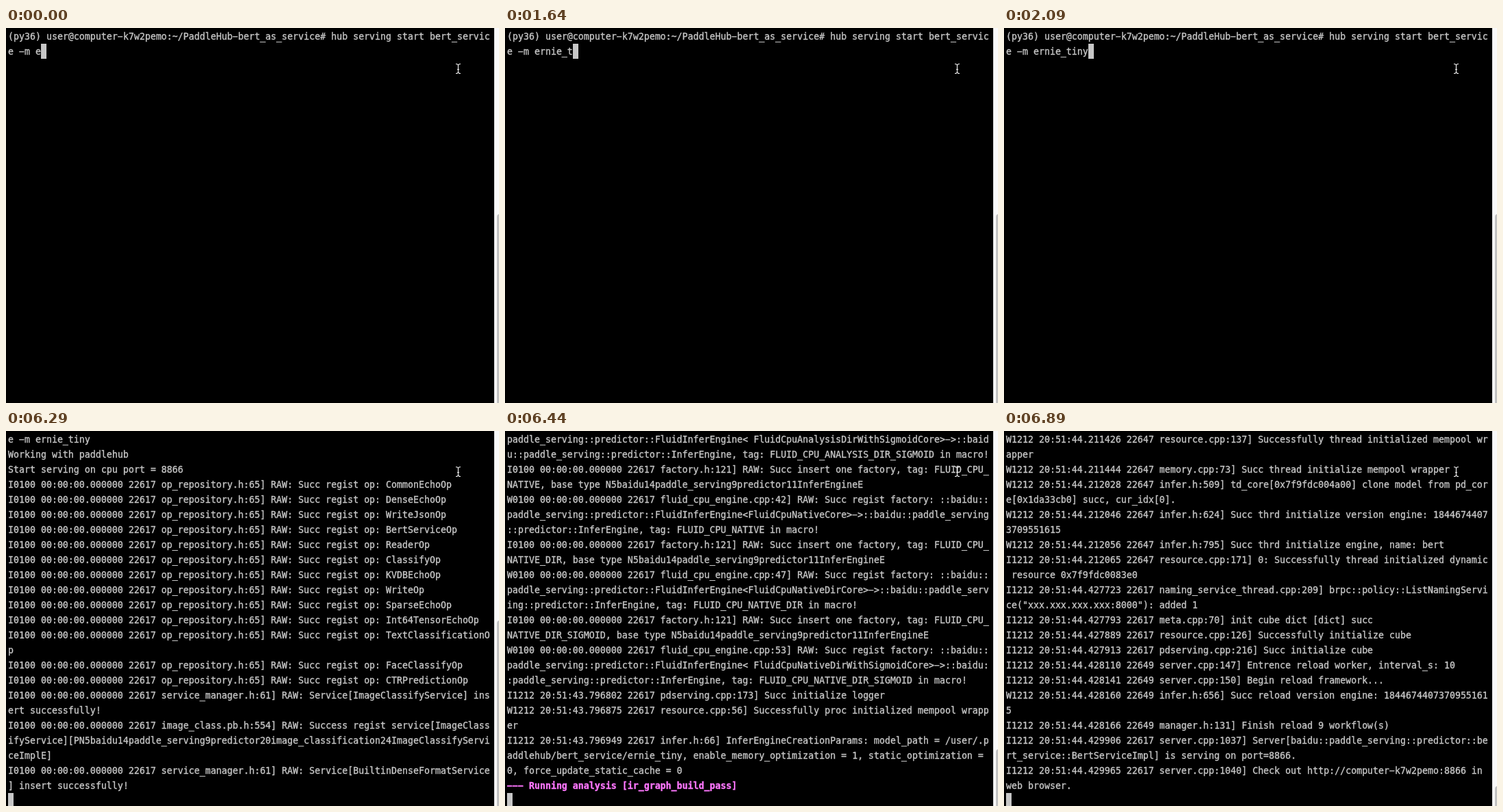
Animation of 719 by 548 pixels, one loop 8000 ms. Source, as an HTML page:

```html
<!DOCTYPE html>
<html lang="en">
<head>
<meta charset="utf-8">
<title>Terminal session</title>
<style>
html, body { margin: 0; width: 100%; height: 100%; overflow: hidden; background: #000; }
#stage { position: relative; width: 719px; height: 548px; overflow: hidden; }
#stage > * { position: absolute; }
#screen {
  left: 3px; top: 2px; color: #c7c7c7; white-space: pre;
  font: 13.289px/22px "DejaVu Sans Mono", monospace;
  -webkit-text-stroke: 0.35px;
}
#screen div { height: 22px; }
#screen .pass { color: #ff77ff; font-weight: bold; }
#cursor { width: 8px; height: 22px; background: #c7c7c7; }
#track { left: 712px; top: 0; width: 7px; height: 548px; background: #fafafa; }
#thumb { left: 716px; width: 8px; height: 600px; border-radius: 4px; background: #c1c1c1; }
#pointer { left: 655px; top: 51px; }
</style>
</head>
<body>
<div id="stage">
  <div id="screen"></div>
  <div id="cursor"></div>
  <div id="track"></div>
  <div id="thumb"></div>
  <svg id="pointer" width="9" height="17" fill="none" stroke="#eee" stroke-width="1.2">
    <path d="M1 1.5Q4.5 1.5 4.5 4V13Q4.5 15.5 1 15.5M8 1.5Q4.5 1.5 4.5 4M4.5 13Q4.5 15.5 8 15.5M3 9.5H6"/>
  </svg>
</div>
<script>
const LOOP = 8000, COLS = 88, ROWS = 24;
const $ = id => document.getElementById(id);
const host = 'computer-k7w2pemo';
const command = `(py36) user@${host}:~/PaddleHub-bert_as_service# hub serving start bert_service -m `;
const model = 'ernie_tiny';
const keyTimes = [0, 150, 290, 440, 590, 1040, 1640, 1790, 1940, 2090];

const boot = (level, msg) => `${level}0100 00:00:00.000000 22617 ${msg}`;
const run = (level, time, thread, msg) => `${level}1212 20:51:${time} ${thread} ${msg}`;
const wrap = lines => lines.flatMap(line => line.match(new RegExp(`.{1,${COLS}}`, 'g')));

// Operator registration
const op = name => boot('I', `op_repository.h:65] RAW: Succ regist op: ${name}Op`);
const inserted = name => boot('I', `service_manager.h:61] RAW: Service[${name}] insert successfully!`);
const registered = wrap([
  command + model,
  'Working with paddlehub',
  'Start serving on cpu port = 8866',
  ...['CommonEcho', 'DenseEcho', 'WriteJson', 'BertService', 'Reader', 'Classify', 'KVDBEcho', 'Write',
    'SparseEcho', 'Int64TensorEcho', 'TextClassification', 'FaceClassify', 'CTRPrediction'].map(op),
  inserted('ImageClassifyService'),
  boot('I', 'image_class.pb.h:554] RAW: Success regist service[ImageClassifyService]' +
    '[PN5baidu14paddle_serving9predictor20image_classification24ImageClassifyServiceImplE]'),
  inserted('BuiltinDenseFormatService')
]);

// Engine factories
const engine = (core, tag) => `paddle_serving::predictor::FluidInferEngine<${core}Core>->` +
  `::baidu::paddle_serving::predictor::InferEngine, tag: FLUID_CPU_${tag} in macro!`;
const factory = (line, core, tag) =>
  boot('W', `fluid_cpu_engine.cpp:${line}] RAW: Succ regist factory: ::baidu::${engine(core, tag)}`);
const made = tag => boot('I', `factory.h:121] RAW: Succ insert one factory, tag: FLUID_CPU_${tag}, ` +
  'base type N5baidu14paddle_serving9predictor11InferEngineE');
const factories = wrap([
  engine(' FluidCpuAnalysisDirWithSigmoid', 'ANALYSIS_DIR_SIGMOID'),
  made('NATIVE'),
  factory(42, 'FluidCpuNative', 'NATIVE'),
  made('NATIVE_DIR'),
  factory(47, 'FluidCpuNativeDir', 'NATIVE_DIR'),
  made('NATIVE_DIR_SIGMOID'),
  factory(53, ' FluidCpuNativeDirWithSigmoid', 'NATIVE_DIR_SIGMOID'),
  run('I', '43.796802', 22617, 'pdserving.cpp:173] Succ initialize logger'),
  run('W', '43.796875', 22617, 'resource.cpp:56] Successfully proc initialized mempool wrapper'),
  run('I', '43.796949', 22617, 'infer.h:66] InferEngineCreationParams: model_path = ' +
    '/user/.paddlehub/bert_service/ernie_tiny, enable_memory_optimization = 1, ' +
    'static_optimization = 0, force_update_static_cache = 0'),
  '--- Running analysis [ir_graph_build_pass]'
]);

// Worker threads
const version = '18446744073709551615';
const ready = (time, thread, id) => run('I', `44.${time}`, thread,
  `resource.cpp:171] 0: Successfully thread initialized dynamic resource 0x7f9f${id}0083e0`);
const worker = (thread, id, times) => {
  const last = times.pop();
  return [
    'memory.cpp:73] Succ thread initialize mempool wrapper',
    'resource.cpp:137] Successfully thread initialized mempool wrapper',
    'memory.cpp:73] Succ thread initialize mempool wrapper',
    `infer.h:509] td_core[0x7f9f${id}004a00] clone model from pd_core[0x1da33cb0] succ, cur_idx[0].`,
    `infer.h:624] Succ thrd initialize version engine: ${version}`,
    'infer.h:795] Succ thrd initialize engine, name: bert'
  ].map((msg, i) => run('W', `44.${times[i]}`, thread, msg)).concat(ready(last, thread, id));
};
const workers = wrap([
  ready(210031, 22646, 'f0'),
  ...worker(22648, 'e4', [210291, 210311, 210340, 211247, 211267, 211271, 211287]),
  ...worker(22647, 'dc', [211407, 211426, 211444, 212028, 212046, 212056, 212065])
]);
const serving = workers.concat(wrap([
  run('I', '44.427723', 22617, 'naming_service_thread.cpp:209] ' +
    'brpc::policy::ListNamingService("xxx.xxx.xxx.xxx:8000"): added 1'),
  run('I', '44.427793', 22617, 'meta.cpp:70] init cube dict [dict] succ'),
  run('I', '44.427889', 22617, 'resource.cpp:126] Successfully initialize cube'),
  run('I', '44.427913', 22617, 'pdserving.cpp:216] Succ initialize cube'),
  run('I', '44.428110', 22649, 'server.cpp:147] Entrence reload worker, interval_s: 10'),
  run('I', '44.428141', 22649, 'server.cpp:150] Begin reload framework...'),
  run('W', '44.428160', 22649, `infer.h:656] Succ reload version engine: ${version}`),
  run('I', '44.428166', 22649, 'manager.h:131] Finish reload 9 workflow(s)'),
  run('I', '44.429906', 22617, 'server.cpp:1037] Server[baidu::paddle_serving::predictor::' +
    'bert_service::BertServiceImpl] is serving on port=8866.'),
  run('I', '44.429965', 22617, `server.cpp:1040] Check out http://${host}:8866 in web browser.`)
]));

// Each state: start time, rows, scrollbar thumb top, whether the cursor stays on the last row
const states = [
  ...keyTimes.map((time, i) => [time, wrap([command + model.slice(0, i + 1)]), 272, true]),
  [2690, wrap([command + model]), 272],
  [6290, registered, 277],
  [6440, factories, 465],
  [6740, workers, 517],
  [6890, serving, 519]
];

function show([, allRows, thumbTop, typing]) {
  const rows = allRows.slice(-ROWS);
  $('screen').replaceChildren(...rows.map(text => {
    const row = document.createElement('div');
    // The terminal's hyphen is as wide as a minus sign
    row.textContent = text.replaceAll('-', '\u2212');
    if (text.startsWith('---')) row.className = 'pass';
    return row;
  }));
  const line = typing ? rows.length - 1 : rows.length;
  const col = typing ? rows[line].length : 0;
  $('cursor').style.left = 3 + 8 * col + 'px';
  $('cursor').style.top = 1 + 22 * line + 'px';
  $('thumb').style.top = thumbTop + 'px';
}

let shown;
function tick() {
  const t = performance.now() % LOOP;
  const state = states.findLast(([start]) => start <= t);
  if (state !== shown) show(shown = state);
  requestAnimationFrame(tick);
}
tick();
</script>
</body>
</html>
```
